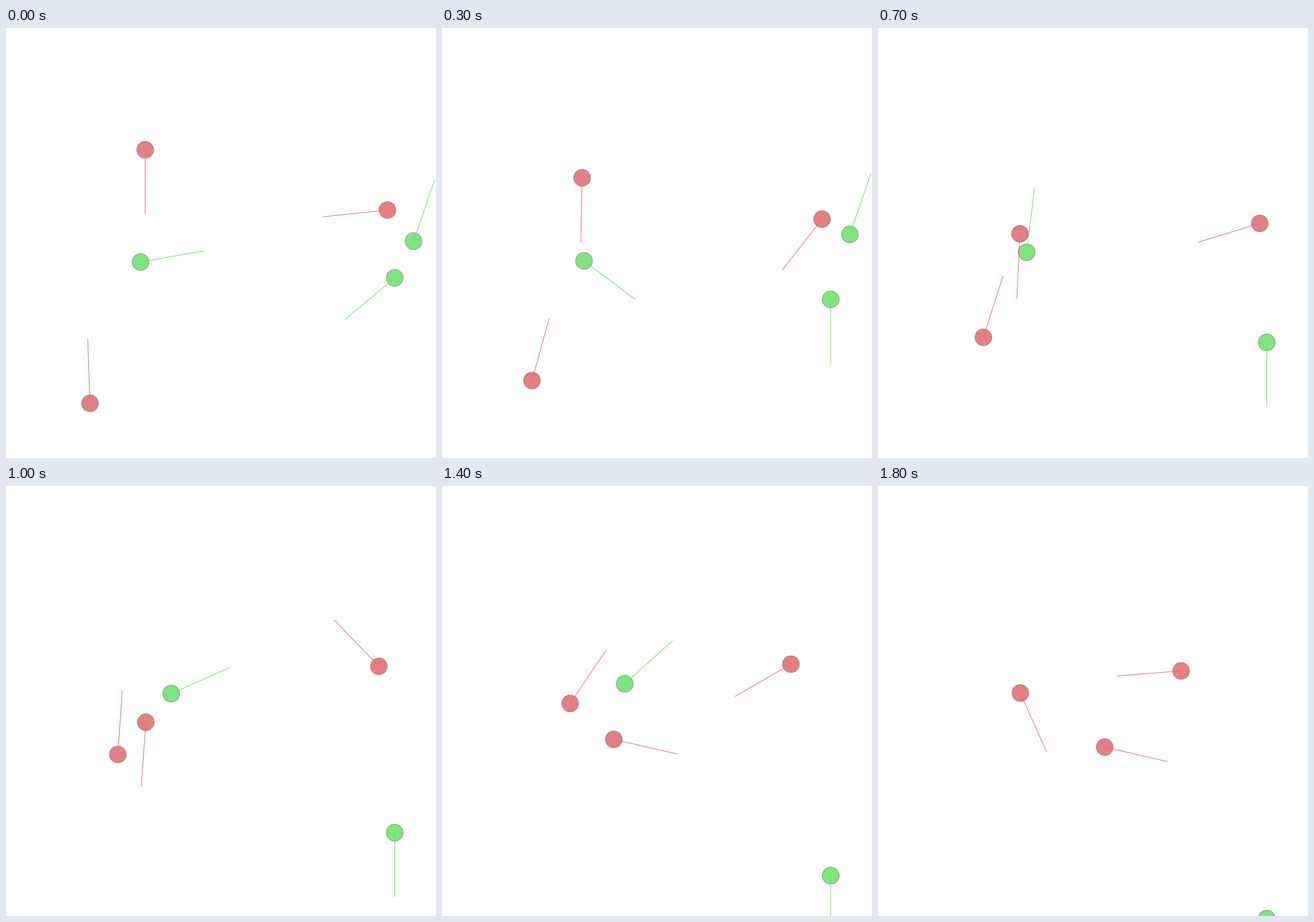
Recreate the animation shown at these times as a matplotlib script. Size 700 by 700 pixels, loop 1900 ms.

```python
import numpy as np
import matplotlib.pyplot as plt
from matplotlib.animation import FuncAnimation
from matplotlib.patches import Circle

SIZE, DPI = 700, 100
FRAMES, INTERVAL = 19, 100
RADIUS, SIGHT = 14, 105
PREY_STRIDE, HUNTER_STRIDE = 17.5, 22.8
PX = 72 / DPI

fig = plt.figure(figsize=(SIZE / DPI, SIZE / DPI), dpi=DPI, facecolor="white")
ax = fig.add_axes([0, 0, 1, 1])
ax.set_xlim(0, SIZE)
ax.set_ylim(SIZE, 0)
ax.axis("off")


def glide(keys, step):
    """Value at a step, moving evenly between (step, value...) keys."""
    t, *values = zip(*keys)
    return [np.interp(step, t, v) for v in values]


class Walker:
    """A disc with a line of sight; it walks a path and swings its aim."""

    def __init__(self, fill, stroke, z, path, aim, gone=FRAMES):
        self.path, self.aim, self.gone = path, aim, gone
        self.disc = Circle((0, 0), RADIUS - 0.3, fc=fill, ec="#858078",
                           lw=0.8 * PX, zorder=z)
        ax.add_patch(self.disc)
        self.sight, = ax.plot([], [], color=stroke, lw=PX, zorder=z + 1,
                              solid_capstyle="butt", snap=False)

    def update(self, step):
        x, y = glide(self.path, step)
        angle = np.radians(glide(self.aim, step)[0])
        self.disc.center = (x, y)
        self.sight.set_data([x, x + SIGHT * np.cos(angle)],
                            [y, y - SIGHT * np.sin(angle)])
        for part in (self.disc, self.sight):
            part.set_visible(step < self.gone)


def prey(path, aim, gone=FRAMES):
    return Walker("#80e482", "#66e066", 1, path, aim, gone)


def hunter(path, aim):
    return Walker("#e48081", "#e86a6a", 3, path, aim)


walkers = [
    # wanders off to the right until it is caught
    prey([(0, 219, 381), (5, 239.5, 378), (7, 242, 365), (10, 269, 338),
          (14, 297.5, 322)],
         [(0, 10), (3, -37), (5, 70), (7, 83), (10, 24), (14, 42)], gone=16),
    # stays at the edge, turns round, is caught
    prey([(0, 663.5, 347), (3, 664, 336), (5, 666.7, 344)],
         [(3, 71), (5, -82)], gone=7),
    # turns once, then runs straight down
    prey([(1, 632.8, 406.8), (18, 632.8, 406.8 + 17 * PREY_STRIDE)],
         [(0, 220), (1, 270)]),
    # marches down, then swings to the right
    hunter([(1, 226.6, 198.3), (7, 231.2, 198.3 + 6 * HUNTER_STRIDE),
            (10, 227.6, 384.5), (14, 279.6, 412.5), (18, 369, 425)],
           [(0, -90), (10, -94), (14, -13)]),
    # climbs, then turns back
    hunter([(0, 136.7, 611), (3, 146.5, 574), (5, 164.5, 548), (10, 182, 437),
            (14, 208.6, 354), (18, 231.7, 337)],
           [(0, 92), (5, 63), (10, 86), (14, 56), (18, -66)]),
    # looks about, then heads left
    hunter([(0, 621, 296.3), (4, 618, 316), (7, 621.5, 318), (10, 607, 293.5),
            (14, 568, 290), (18, 493.5, 301)],
           [(0, 186), (3, 232), (5, 63), (7, 197), (10, 134), (14, 210),
            (18, 184.5)]),
]


def draw(step):
    for walker in walkers:
        walker.update(step)
    return []


anim = FuncAnimation(fig, draw, frames=FRAMES, interval=INTERVAL,
                     init_func=lambda: draw(0), repeat=True, repeat_delay=0)
plt.show()
```
